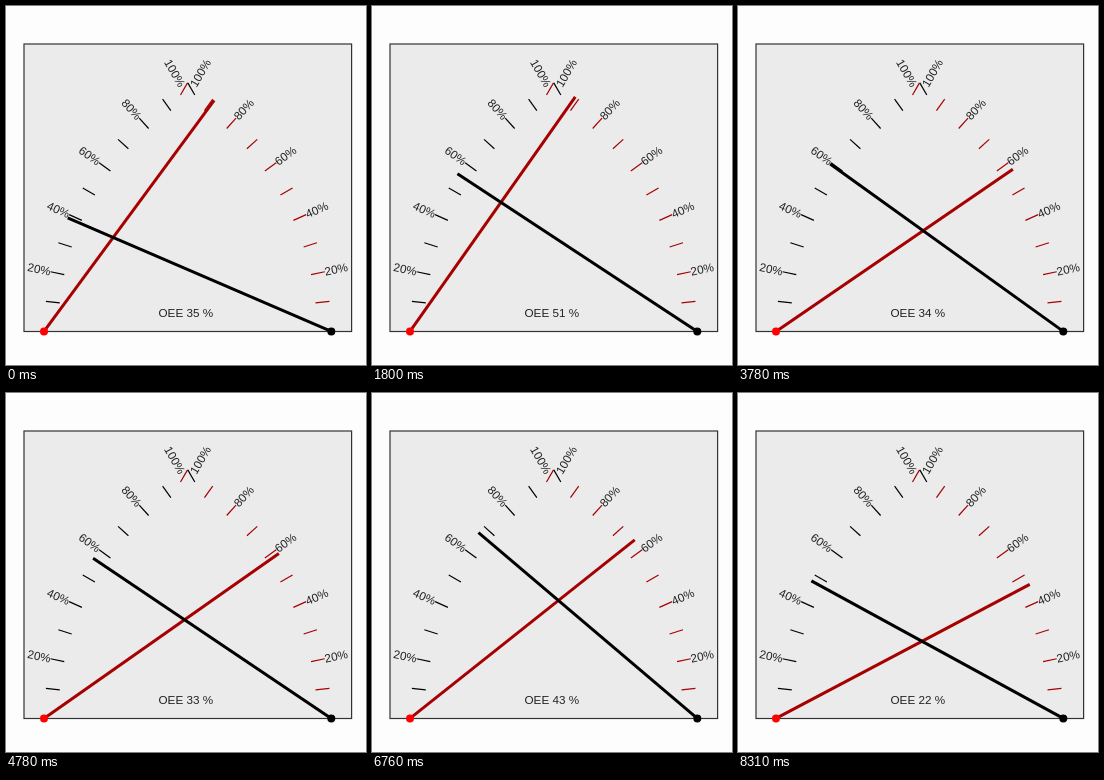
These frames come from a looping animation (360 px wide and 359 px high, 8560 ms). An HTML page:

```html
<!DOCTYPE html>
<html>
<head>
<meta charset="utf-8">
<style>
  html, body { margin: 0; width: 100%; height: 100%; overflow: hidden; background: #fdfdfd; }
  svg { display: block; }
  text { font: 11.7px "Liberation Sans", Arial, sans-serif; fill: #222; }
</style>
</head>
<body>
<svg id="stage" width="360" height="359" viewBox="0 0 360 359">
  <rect x="18" y="38" width="327.6" height="287.5" fill="#ebebeb" stroke="#333" stroke-width="1.2"/>
</svg>
<script>
const LOOP = 8560, RADIUS = 287, BASE = 325.4, DEG_PER_PERCENT = 0.6;
const stage = document.getElementById('stage');

// Key points: [seconds, red percent, black percent]
const keys = [
  [0, 89.4, 38.8], [1.76, 91.4, 55.5], [2.07, 94.3, 56], [2.3, 52, 56.4],
  [2.76, 48.3, 57], [3.76, 57.3, 59.5], [5.3, 59.1, 54.9],
  [6.3, 63, 71.5], [6.76, 64.1, 67.2], [8.3, 46.4, 47.7]
];

// The needles move in three jumps per second
const jumps = [0.07, 0.3, 0.76];

function snap(seconds) {
  const whole = Math.floor(seconds);
  const jump = jumps.findLast(j => whole + j <= seconds + 1e-6);
  return Math.max(0, whole + (jump ?? jumps[2] - 1));
}

function valuesAt(seconds) {
  const next = keys.findIndex(k => k[0] > seconds);
  if (next < 0) return keys.at(-1).slice(1);
  const a = keys[next - 1], b = keys[next];
  const part = (seconds - a[0]) / (b[0] - a[0]);
  return [1, 2].map(i => a[i] + (b[i] - a[i]) * part);
}

function add(parent, tag, attrs, text = '') {
  const el = document.createElementNS('http://www.w3.org/2000/svg', tag);
  for (const key in attrs) el.setAttribute(key, attrs[key]);
  el.textContent = text;
  return parent.appendChild(el);
}

// side is 1 for a dial opening to the right, -1 to the left
function makeDial(x, side, color, dotColor) {
  const turn = percent => `translate(${x} ${BASE}) rotate(${-side * percent * DEG_PER_PERCENT})`;
  for (let p = 10; p <= 100; p += 10) {
    const mark = add(stage, 'g', { transform: turn(p) });
    add(mark, 'line', { x1: side * 273, x2: side * RADIUS, stroke: color, 'stroke-width': 1.2 });
    if (p % 20 === 0) {
      add(mark, 'text', {
        x: side * RADIUS, y: p === 100 ? 10.5 : 4,
        'text-anchor': side > 0 ? 'start' : 'end'
      }, p + '%');
    }
  }
  return () => {
    const needle = add(stage, 'line', { x2: side * RADIUS, stroke: color, 'stroke-width': 3 });
    add(stage, 'circle', { cx: x, cy: BASE, r: 4, fill: dotColor });
    return percent => needle.setAttribute('transform', turn(percent));
  };
}

const redDial = makeDial(38, 1, '#a60000', '#f00');
const blackDial = makeDial(325.3, -1, '#000', '#000');
const label = add(stage, 'text', { x: 152.5, y: 311.2 });
const setRed = redDial(), setBlack = blackDial();

function draw() {
  const [red, black] = valuesAt(snap(performance.now() % LOOP / 1000));
  setRed(red);
  setBlack(black);
  label.textContent = `OEE ${Math.round(red * black / 100)} %`;
  requestAnimationFrame(draw);
}
draw();
</script>
</body>
</html>
```
